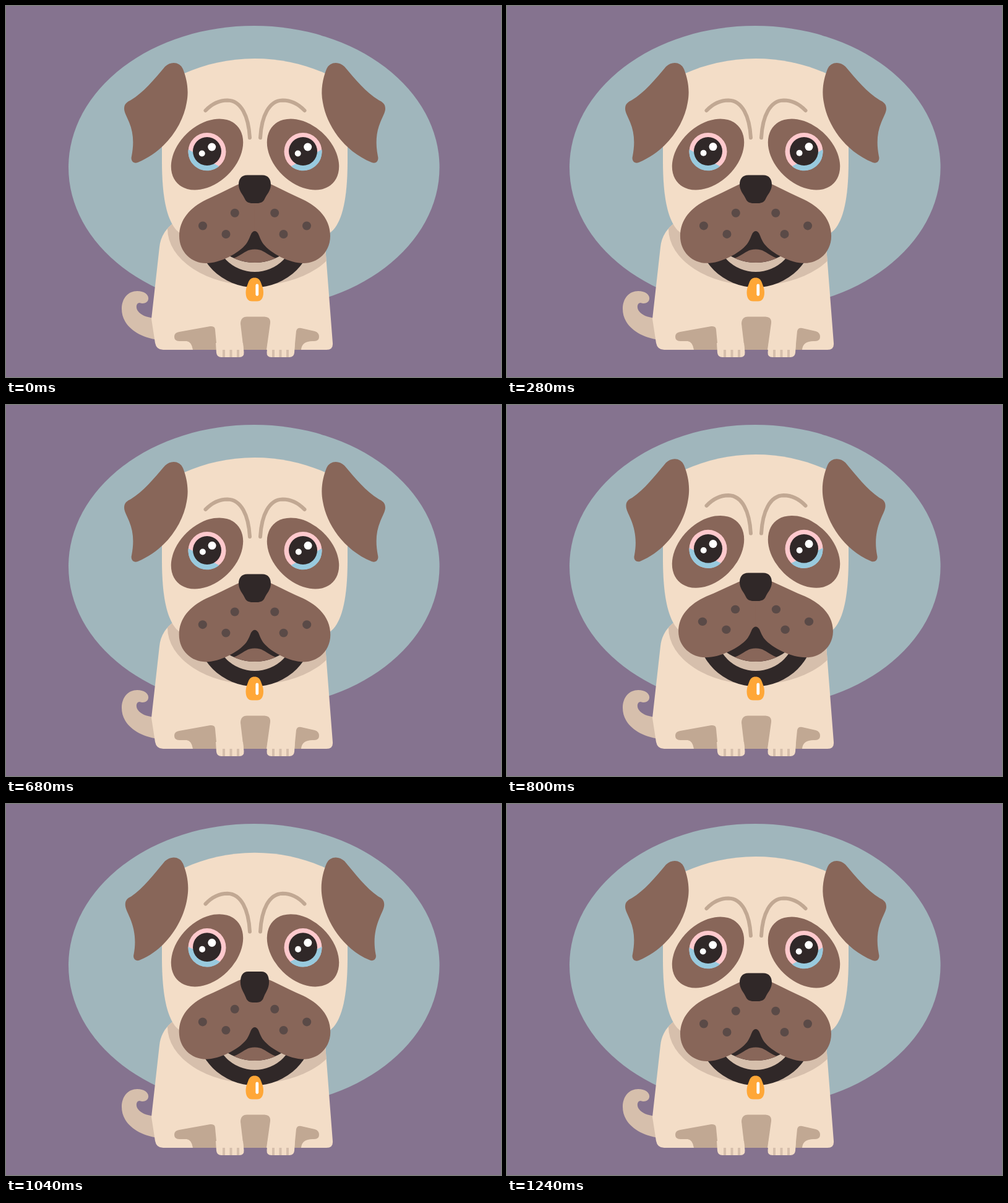
These frames come from a looping animation (800x600 px, 1280 ms). An HTML page:

```html
<!DOCTYPE html>
<html lang="en">
<head>
<meta charset="utf-8">
<title>Pug</title>
<style>
html, body { margin: 0; height: 100%; overflow: hidden; background: #85738f; }
svg { display: block; width: 100vw; height: 100vh; }
.cream { fill: #f3ddc7; }
.tan { fill: #d6bfac; }
.shade { fill: #c1a893; }
.brown { fill: #886659; }
.dark { fill: #302828; }
.line { fill: none; stroke: #c1a893; stroke-width: 6; stroke-linecap: round; }
</style>
</head>
<body>
<svg viewBox="0 0 800 600">
  <defs>
    <path id="body" d="M290 340C262 352 250 370 248 390L235 506L241 545Q243 556 254 556H518Q529 556 528 545L516 390L500 340Z"/>
    <clipPath id="bodyClip"><use href="#body"/></clipPath>
  </defs>
  <ellipse cx="400.800" cy="261" rx="299.800" ry="229" fill="#a0b6bc"/>

  <path class="tan" d="M246 540C210 535 187 515 187 490C187 472 198 461 212 461C224 461 231 467 230 474C229 481 221 482 216 480C211 480 209 487 213 493C218 500 226 503 240 505Z"/>
  <use href="#body" class="cream"/>
  <ellipse class="tan" cx="402" cy="360" rx="141" ry="92" clip-path="url(#bodyClip)"/>
  <g class="shade">
    <path d="M272 535Q272 528 280 527L330 518Q338 517 338 524L341 556H302Q300 543 292 542H280Q272 542 272 535Z"/>
    <path d="M389 502.500H418Q428 503 427 513L421 556H384L379 514Q379 503 389 502.500Z"/>
    <path d="M466 556L469 526Q470 520 477 521L499 526Q506 528 506 535Q506 542 498 542Q478 541 477 556Z"/>
  </g>
  <path id="paw" class="cream" d="M339 545L340 561Q341 568 348 568H377Q385 568 384.500 560L383 545Z"/>
  <use href="#paw" transform="matrix(-1 0 0 1 806 0)"/>
  <path d="M352 556v12M363.500 556v12M375 556v12M432 556v12M443.500 556v12M455 556v12" stroke="#d6bfac" stroke-width="4"/>
  <circle class="dark" cx="402" cy="359" r="96"/>

  <g id="head">
    <path id="skull" class="cream" d="M402 85C360 85 322 94 288 109L270 120L252 200V250C252 310 260 345 275 362L300 385H402Z"/>
    <use href="#skull" transform="matrix(-1 0 0 1 804 0)"/>
    <g id="face">
      <ellipse class="brown" rx="67" ry="47" transform="translate(325 240) rotate(-44)"/>
      <circle cx="325" cy="235.500" r="30.500" fill="#ffc9cd"/>
      <path id="iris" d="M294.800 231A30.500 30.500 0 0 0 343.500 260Z" fill="#98cade"/>
      <circle class="dark" cx="325" cy="235" r="23"/>
      <path id="brow" class="line" d="M322.500 169C334 157 345 152.500 358 152.500C380 153 392 178 394 213"/>
    </g>
    <use href="#face" transform="matrix(-1 0 0 1 805 0)"/>
    <g id="bigGlints" fill="#fff"><circle cx="332.700" cy="228" r="6.500"/><circle cx="487.700" cy="228" r="6.500"/></g>
    <g id="smallGlints" fill="#fff"><circle cx="316.700" cy="238.500" r="5"/><circle cx="471.700" cy="238.500" r="5"/></g>
  </g>

  <circle class="tan" cx="402" cy="365" r="65"/>
  <path class="dark" d="M320.300 340A82 82 0 0 0 483.700 340Z"/>
  <path class="brown" d="M368 407.700A82 82 0 0 0 436 407.700C425 404 417 396 410 394.500Q402 392.500 394 394.500C387 396 379 404 368 407.700Z"/>
  <g id="muzzle">
    <g id="jowl">
      <path class="brown" d="M402 281C390 282 381 286 371 290.500C355 298 340 306 324 313C297 326 280 346 280 372C280 398 300 416 323 416C346 416 376 400 388 385C393 378 394 373 396.500 368Q399 364 402 364Z"/>
      <g fill="#5a4a47"><circle cx="318" cy="355.500" r="7"/><circle cx="355.500" cy="369" r="7"/><circle cx="369.800" cy="334.800" r="7"/></g>
    </g>
    <use href="#jowl" transform="matrix(-1 0 0 1 804 0)"/>
  </g>
  <path id="nose" class="dark" d="M390 273.500H414C424 273.500 428 280 428 289C428 299 421 305 418 312C416 317 411 319 406 319H398C393 319 388 317 386 312C383 305 376 299 376 289C376 280 380 273.500 390 273.500Z"/>
  <path id="ear" class="brown"/>
  <use href="#ear" transform="matrix(-1 0 0 1 804 0)"/>

  <path d="M401.700 439.500C407 439.500 410 442 412 447.500C414 453 416 457 416 463C416 473 412 477.500 406 477.500H397.500C391.500 477.500 387.500 473 387.500 463C387.500 457 389.500 453 391.500 447.500C393.500 442 396.500 439.500 401.700 439.500Z" fill="#ffa737"/>
  <path d="M405.800 452v14.500" stroke="#fff" stroke-width="4.800" stroke-linecap="round"/>
</svg>
<script>
const LOOP = 1280;
const earLow = 'M257 98C266 89 281 90 286 102C292 117 296 136 292 156C286 192 259 234 213 253C206 256 201 250 203 243C207 222 206 205 199 188C195 178 191 172 191 166C191 158 196 155 202 152C222 140 240 118 257 98Z';
const earHigh = 'M257 90C266 81 281 82 286 94C293 111 297 131 293 152C287 190 260 234 218 252C211 255 206 250 208 243C212 222 209 202 201 183C197 173 193.5 168 193.5 161C193.5 154 197 151 203 148C222 135 240 110 257 90Z';

const $ = id => document.getElementById(id);
const move = (id, value) => $(id).setAttribute('transform', value);
const progress = (t, from, to) => Math.min(1, Math.max(0, (t - from) / (to - from)));
const ease = (t, from, to) => (1 - Math.cos(Math.PI * progress(t, from, to))) / 2;
const bump = (t, from, to) => (1 - Math.cos(2 * Math.PI * progress(t, from, to))) / 2;
const scaleAt = (x, y, sx, sy) => `translate(${x} ${y}) scale(${sx} ${sy}) translate(${-x} ${-y})`;

function mixPath(a, b, k) {
  const number = /[\d.]+/g, ends = b.match(number);
  let i = 0;
  return a.replace(number, n => +n + (ends[i++] - n) * k);
}

function draw(t) {
  const lift = 1.05 * (ease(t, 665, 920) - ease(t, 962, 1165));
  const pant = bump(t, 0, 300) + bump(t, 300, 600) + 1.6 * bump(t, 640, 1080);
  const sniff = bump(t, 800, 1240);
  const gaze = Math.sin(Math.PI * progress(t, 0, 1160));

  move('head', scaleAt(402, 409, 1, 1 + 0.0272 * lift));
  move('brow', `translate(0 ${-4 * lift})`);
  move('iris', `rotate(${-2 - 6 * lift} 325 235.5)`);
  move('bigGlints', `translate(${0.4 * gaze} ${-0.6 * gaze})`);
  move('smallGlints', `translate(${1.2 * gaze} ${-gaze})`);
  move('muzzle', `translate(0 ${-4 * lift}) ` + scaleAt(402, 283, 1 + 0.018 * pant, 1 - 0.03 * pant));
  move('nose', `translate(0 ${-3.5 * lift}) ` + scaleAt(402, 273.5, 1 - 0.115 * sniff, 1 + 0.1 * sniff));
  $('ear').setAttribute('d', mixPath(earLow, earHigh, lift));
}

function tick() {
  draw(performance.now() % LOOP);
  requestAnimationFrame(tick);
}
tick();
</script>
</body>
</html>
```
